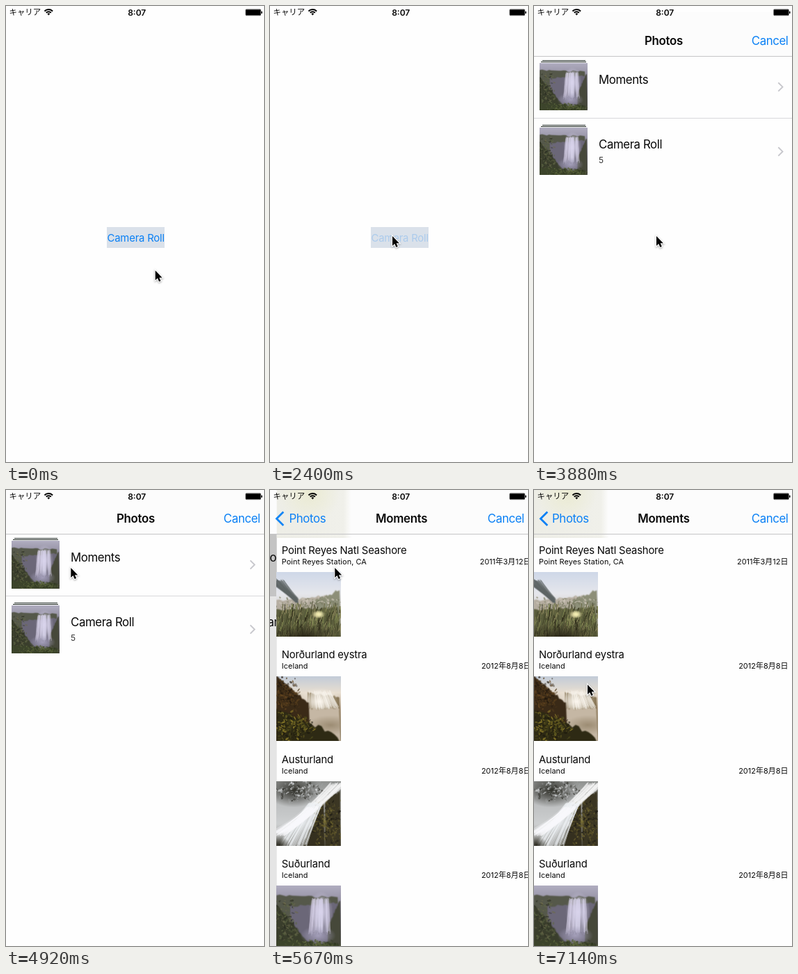
An HTML page with a canvas for the animation above (8 s loop, 371 by 656 pixels).

```html
<!DOCTYPE html>
<html lang="ja">
<head>
<meta charset="utf-8">
<title>Photo picker</title>
<style>
html, body { margin: 0; width: 100%; height: 100%; overflow: hidden; background: #fefefe; }
canvas { display: block; width: 371px; height: 656px; }
</style>
</head>
<body>
<canvas id="stage"></canvas>
<script>
const W = 371, H = 656, LOOP = 8000, TICK = 150;
const BLUE = '#0a80f5', PAPER = '#fefefe', INK = '#080808';
const FAMILY = 'Inter, "Noto Sans CJK JP", "Noto Sans CJK", sans-serif';
const PRESS = 2400, RELEASE = 3290, SELECT = 5370;
const canvas = document.getElementById('stage');
const ctx = canvas.getContext('2d');
const dpr = window.devicePixelRatio || 1;
canvas.width = W * dpr;
canvas.height = H * dpr;

// While something moves, the screen refreshes once per tick.
const ACTIVE = [[0, 300], [1200, 1500], [PRESS, PRESS], [RELEASE, 4030], [4480, 4920], [SELECT, 6110], [6700, 7140]];

function heldTime(t) {
  const [from, to] = ACTIVE.findLast(([from]) => from <= t) ?? ACTIVE[0];
  return t >= to ? to : from + Math.floor((t - from) / TICK) * TICK;
}

// Pointer moves: start, end, target x, target y.
const MOVES = [
  [0, 300, 212.5, 376], [1050, 1500, 176, 331], [4330, 4920, 93.3, 112], [6550, 7140, 77, 280]
];

const clamp = v => Math.max(0, Math.min(1, v));
const smooth = u => u * u * (3 - 2 * u);
const mix = (a, b, u) => a + (b - a) * u;

// Remaining distance (1 to 0) of a critically damped spring.
function spring(ms, rate) {
  const x = Math.max(0, ms) / 1000 * rate;
  return (1 + x) * Math.exp(-x);
}

function pointerAt(t) {
  let x = 214.7, y = 380.5;
  for (const [from, to, tx, ty] of MOVES) {
    const u = smooth(clamp((t - from) / (to - from)));
    x = mix(x, tx, u);
    y = mix(y, ty, u);
  }
  return [x, y];
}

function line(color, width, ...pts) {
  ctx.beginPath();
  for (let i = 0; i < pts.length; i += 2) ctx.lineTo(pts[i], pts[i + 1]);
  ctx.strokeStyle = color;
  ctx.lineWidth = width;
  ctx.stroke();
}

// An angle sign with its tip at x, y; dir 1 points right, -1 left.
function chevron(color, width, x, y, size, dir) {
  line(color, width, x - size * dir, y - size, x, y, x - size * dir, y + size);
}

function rect(color, x, y, w, h) {
  ctx.fillStyle = color;
  ctx.fillRect(x, y, w, h);
}

function text(str, x, y, size, { color = INK, weight = 400, align = 'left', track = 0 } = {}) {
  ctx.font = `${weight} ${size}px ${FAMILY}`;
  ctx.letterSpacing = track + 'px';
  ctx.textAlign = align;
  ctx.fillStyle = color;
  ctx.fillText(str, x, y);
}

const body = (str, x, y, opts) => text(str, x, y, 16.83, { track: -0.41, ...opts });
const label = (str, x, y, opts) => text(str, x, y, 14.84, { track: -0.18, ...opts });
const note = (str, x, y, opts) => text(str, x, y, 10.9, { track: 0.07, ...opts });

function shifted(x, y, draw) {
  ctx.save();
  ctx.translate(x, y);
  draw();
  ctx.restore();
}

function faded(alpha, draw) {
  ctx.save();
  ctx.globalAlpha = clamp(alpha);
  draw();
  ctx.restore();
}

// --- Photos: seeded landscapes on a 93 px square ---

const SIDE = 93;

function scene(seed, sky, paint) {
  const img = document.createElement('canvas');
  img.width = img.height = SIDE * 2;
  const c = img.getContext('2d');
  c.scale(2, 2);
  const rnd = () => (seed = (seed * 16807) % 2147483647) / 2147483647;
  const around = (v, r) => v + (rnd() + rnd() - 1) * r;
  const pick = list => list[Math.floor(rnd() * list.length)];

  const wash = c.createLinearGradient(0, 0, 0, SIDE);
  sky.forEach((color, i) => wash.addColorStop(i / (sky.length - 1), color));
  c.fillStyle = wash;
  c.fillRect(0, 0, SIDE, SIDE);

  paint({
    // Land below a rough line.
    ridge(color, x0, y0, x1, y1, rough = 3) {
      c.filter = 'blur(1.5px)';
      c.fillStyle = color;
      c.beginPath();
      c.moveTo(x0, SIDE + 5);
      for (let u = 0; u <= 1; u += 0.05) c.lineTo(mix(x0, x1, u), around(mix(y0, y1, u), rough));
      c.lineTo(x1, SIDE + 5);
      c.fill();
      c.filter = 'none';
    },
    glow(color, x, y, rx, ry = rx) {
      c.save();
      c.translate(x, y);
      c.scale(rx, ry);
      const g = c.createRadialGradient(0, 0, 0, 0, 0, 1);
      g.addColorStop(0, color);
      g.addColorStop(1, color + '00');
      c.fillStyle = g;
      c.fillRect(-1, -1, 2, 2);
      c.restore();
    },
    tufts(colors, x, y, rx, ry, n = 160) {
      for (let i = 0; i < n; i++) {
        c.globalAlpha = 0.3 + rnd() * 0.4;
        c.fillStyle = pick(colors);
        c.beginPath();
        c.ellipse(around(x, rx), around(y, ry), 1 + rnd() * 2, 0.6 + rnd(), rnd() * 3, 0, 7);
        c.fill();
      }
      c.globalAlpha = 1;
    },
    // Fine threads of water, spreading from w0 to w1.
    stream(color, x0, y0, x1, y1, w0, w1, bend = 0) {
      c.strokeStyle = color;
      c.globalAlpha = 0.3;
      for (let i = 0; i < 70; i++) {
        const side = rnd() - 0.5, ax = x0 + side * w0, bx = x1 + side * w1;
        c.lineWidth = 0.7 + rnd() * 1.5;
        c.beginPath();
        c.moveTo(ax, around(y0, 3));
        c.quadraticCurveTo((ax + bx) / 2 + bend, (y0 + y1) / 2, bx, around(y1, 5));
        c.stroke();
      }
      c.globalAlpha = 1;
    },
    blades(colors, top, n, height) {
      c.lineWidth = 0.9;
      for (let i = 0; i < n; i++) {
        const x = rnd() * SIDE, y = mix(top, SIDE + 8, i / n);
        c.strokeStyle = pick(colors);
        c.beginPath();
        c.moveTo(x, y);
        c.lineTo(around(x + 2, 4), y - height * (0.5 + rnd()));
        c.stroke();
      }
    }
  });
  return img;
}

const dune = scene(11, ['#cfd8e8', '#e6e7ec', '#cfcac2', '#8a8668'], p => {
  p.ridge('#b5ada0', 0, 42, 93, 33);
  p.ridge('#8d8f78', 55, 40, 93, 26);
  p.tufts(['#8b8a72', '#cdc5b8', '#70735a'], 46, 46, 50, 10);
  p.ridge('#5a5d3c', 0, 54, 93, 52);
  p.blades(['#7f8650', '#45462a', '#6b6a45', '#302d1b', '#8c865c'], 58, 300, 11);
  p.glow('#2c2818', 40, 93, 60, 20);
  p.stream('#5c6464', 0, 12, 30, 42, 22, 4);
  p.glow('#f6efb4', 61, 61, 10, 6);
  p.glow('#f6efb4', 61, 61, 8, 6);
});

const pool = scene(23, ['#c3ccd8', '#e8ded0', '#b6a590', '#9f9078', '#5f5338'], p => {
  p.ridge('#74603c', 45, 24, 93, 30, 2);
  p.stream('#f6f1ea', 62, 22, 68, 46, 30, 44);
  p.glow('#fbf6ee', 62, 36, 32, 20);
  p.ridge('#c5b7a4', 40, 47, 93, 46, 2);
  p.ridge('#3a2a17', 0, 0, 49, 40);
  p.tufts(['#6a4a22', '#21180e', '#503a1c'], 14, 26, 22, 26);
  p.glow('#9d8d74', 78, 70, 34, 14);
  p.ridge('#2e2a14', 0, 46, 93, 87, 5);
  p.tufts(['#7b7026', '#a3902f', '#1c190d', '#4e4b1c'], 22, 72, 38, 24, 240);
});

const rapids = scene(37, ['#8f918f', '#bdbfc0', '#cdcfd0', '#8a8a86'], p => {
  p.glow('#35352f', 25, 14, 40, 24);
  p.tufts(['#e4e6e8', '#34342e', '#a2a5a5'], 40, 16, 45, 18);
  p.ridge('#35301f', 36, 93, 70, 26, 4);
  p.ridge('#3b3623', 70, 26, 93, 15, 4);
  p.tufts(['#6a602c', '#1a1812', '#4c4526', '#7c7236'], 74, 62, 26, 38, 220);
  p.stream('#f3f4f6', 88, 4, 56, 36, 22, 18);
  p.stream('#eef0f3', 56, 32, 22, 95, 20, 42, -2);
  p.stream('#f8f9fa', 52, 38, 2, 76, 18, 20, 6);
  p.glow('#2e2c22', 4, 92, 16, 12);
});

const falls = scene(53, ['#b0adc0', '#8b8799', '#6a6678', '#4a4b42'], p => {
  p.ridge('#55584a', 0, 14, 93, 17, 2);
  p.ridge('#6b6778', 20, 30, 93, 24);
  p.ridge('#46483a', 74, 60, 93, 18);
  p.ridge('#3a3e2c', 0, 26, 50, 86, 4);
  p.tufts(['#5d6643', '#2a2d22', '#6b6a4c'], 14, 54, 20, 40);
  p.stream('#dcd8ee', 63, 19, 62, 68, 24, 32);
  p.glow('#d9d4ec', 64, 38, 18, 30);
  p.glow('#a49fba', 60, 72, 26, 14);
  p.ridge('#3c442b', 0, 78, 93, 84, 4);
  p.tufts(['#667043', '#2f371f', '#535d36'], 60, 88, 50, 10);
});

// --- Screens ---

function statusBar() {
  text('キャリア', 4.5, 13.3, 11.4);
  text('8:07', 188.2, 13.6, 12, { weight: 600, align: 'center' });
  ctx.strokeStyle = ctx.fillStyle = '#000';
  ctx.lineWidth = 2;
  const fan = r => ctx.arc(61.3, 13, r, -Math.PI * 0.76, -Math.PI * 0.24);
  for (const r of [4.8, 8]) {
    ctx.beginPath();
    fan(r);
    ctx.stroke();
  }
  ctx.beginPath();
  ctx.moveTo(61.3, 13.6);
  fan(2.6);
  ctx.fill();
  ctx.beginPath();
  ctx.roundRect(344.5, 4.7, 22, 9, 1.5);
  ctx.lineWidth = 0.5;
  ctx.stroke();
  ctx.beginPath();
  ctx.rect(345, 5.2, 21, 8);
  ctx.roundRect(367, 7.5, 1.5, 3.5, 0.7);
  ctx.fill();
}

function home(t) {
  rect(PAPER, 0, 0, W, H);
  rect('#dae1ea', 145, 318, 83, 30);
  const pressed = t >= PRESS && t < RELEASE;
  faded(pressed ? 0.22 : 1, () => label('Camera Roll', 186.7, 338.6, { color: BLUE, align: 'center' }));
}

function albumRow(y, name, count) {
  rect('#2c3530', 12, y + 5, 62, 1);
  rect('#17201b', 10, y + 7, 65, 1);
  ctx.drawImage(falls, 8, y + 9, 68.5, 68.5);
  body(name, 93, y + 39.2);
  text(count, 93, y + 59.8, 11.9, { color: '#333' });
  chevron('#c7c7cc', 1.9, 357.5, y + 43.5, 6.2, 1);
}

function albums(t) {
  rect(PAPER, 0, 0, W, H);
  if (t >= SELECT) rect('#d9d9d9', 0, 64, W, 89);
  albumRow(64, 'Moments', '');
  albumRow(157, 'Camera Roll', '5');
  rect('#d8d8da', 0, 152, W, 1);
}

const MOMENTS = [
  ['Point Reyes Natl Seashore', 'Point Reyes Station, CA', '2011年3月12日', dune],
  ['Norðurland eystra', 'Iceland', '2012年8月8日', pool],
  ['Austurland', 'Iceland', '2012年8月8日', rapids],
  ['Suðurland', 'Iceland', '2012年8月8日', falls]
];

function moments() {
  rect(PAPER, 0, 0, W, H);
  MOMENTS.forEach(([place, area, date, img], i) => {
    const y = 118 + i * 150.4;
    label(place, 7, y - 26.3);
    note(area, 7, y - 11.2);
    note(date, 365.5, y - 11.2, { align: 'right' });
    ctx.drawImage(img, -0.5, y, 92.7, 92.7);
  });
}

// A photo scrolled beneath the bar tints it.
function barTint() {
  const edge = ctx.createLinearGradient(0, 0, 107, 0);
  edge.addColorStop(0, '#ededE6');
  edge.addColorStop(0.9, '#f0f0ea');
  edge.addColorStop(1, '#fcfcfc');
  rect(edge, 0, 0, 107, 69);
  const glow = ctx.createRadialGradient(47, 4, 4, 47, 4, 44);
  glow.addColorStop(0, '#ebebd4');
  glow.addColorStop(1, '#ebebd400');
  rect(glow, 0, 0, 94, 50);
}

function navBar(t, pageX) {
  const left = spring(t - 5414, 25.4), done = 1 - left;
  const title = { weight: 600, track: -0.28 };
  const backX = 26 + 133 * left;
  rect('#fcfcfc', 0, 0, W, 64);
  if (t >= SELECT) shifted(pageX, 0, barTint);
  rect('#c4c4c6', 0, 63, W, 1);
  faded(left ** 2, () => body('Photos', backX, 47.2, title));
  faded(done, () => {
    body('Photos', backX, 47.2, { color: BLUE });
    body('Moments', 186.5 + 227 * left, 47.2, { ...title, align: 'center' });
  });
  faded(done ** 5, () => chevron(BLUE, 2.8, 9.5, 41.3, 9.8, -1));
  body('Cancel', 365.5, 47.2, { color: BLUE, align: 'right' });
}

function picker(t) {
  const left = spring(t - 5355, 17.5);
  const pageX = W * left;
  shifted(-0.3 * (W - pageX), 0, () => albums(t));
  if (t >= SELECT) {
    rect(`rgba(0,0,0,${0.1 * (1 - left)})`, 0, 0, W, H);
    shifted(pageX, 0, moments);
  }
  navBar(t, pageX);
}

const ARROW = new Path2D('M0 0V14L3.2 11.1 5.4 16 7.8 15 5.7 10.2H9.9Z');

function pointer() {
  ctx.shadowColor = 'rgba(0,0,0,0.35)';
  ctx.shadowBlur = 2.5 * dpr;
  ctx.shadowOffsetY = dpr;
  ctx.strokeStyle = '#fff';
  ctx.lineWidth = 2.2;
  ctx.stroke(ARROW);
  ctx.shadowColor = 'transparent';
  ctx.fillStyle = '#000';
  ctx.fill(ARROW);
}

function draw(t) {
  ctx.setTransform(dpr, 0, 0, dpr, 0, 0);
  home(t);
  if (t > 3400) shifted(0, H * spring(t - 3396, 18.26), () => picker(t));
  statusBar();
  shifted(...pointerAt(t), pointer);
}

const start = performance.now();
function frame() {
  draw(heldTime((performance.now() - start) % LOOP));
  requestAnimationFrame(frame);
}
frame();
</script>
</body>
</html>
```
